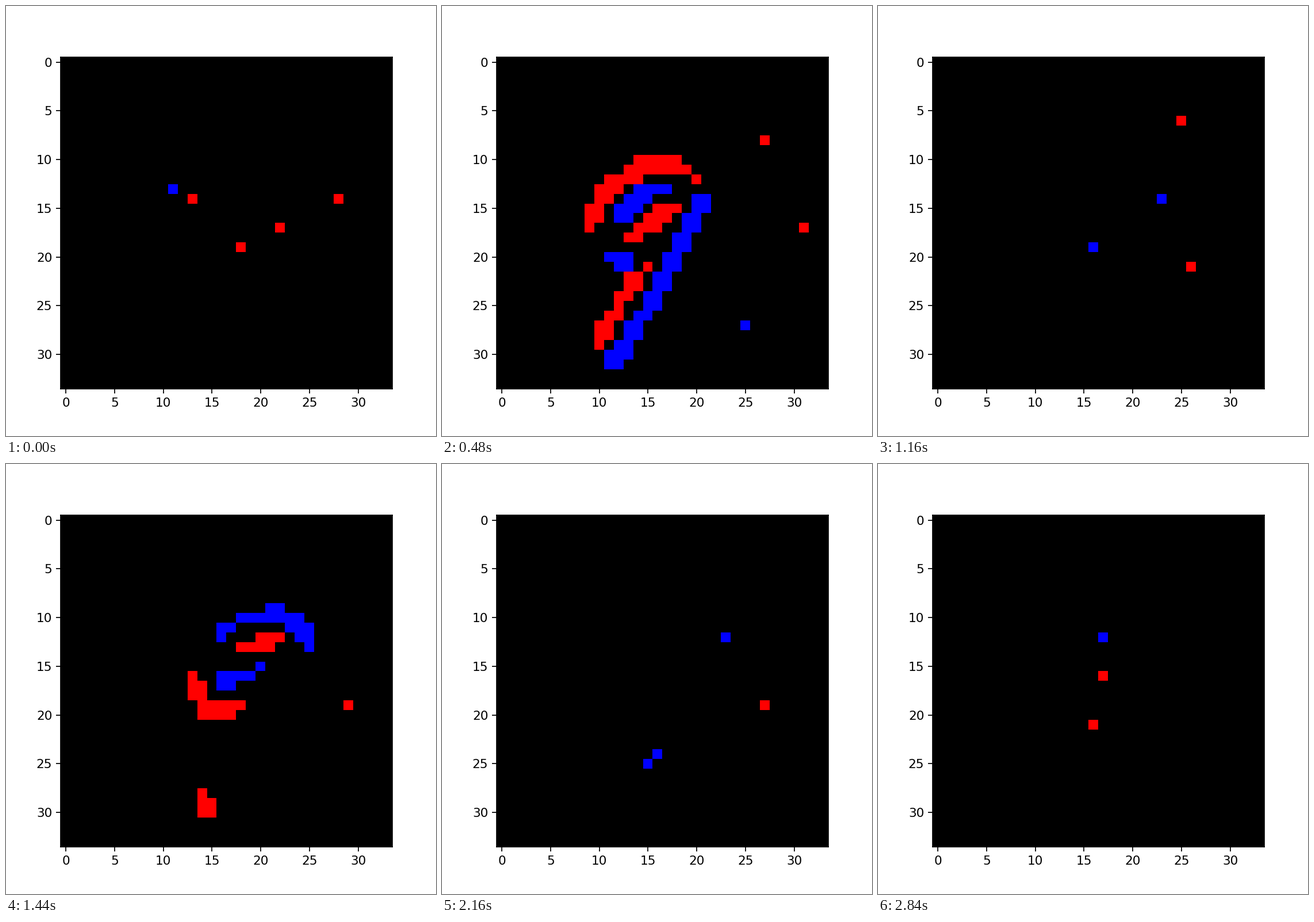
A matplotlib script for the animation above (2.88 s loop, 748 by 748 pixels).

```python
import numpy as np
import matplotlib.pyplot as plt
from matplotlib.animation import FuncAnimation

SIZE, DPI, N = 748, 156, 34
FRAMES, INTERVAL, SWEEP = 72, 40, 24
PEAK, HALF = 13, 8        # middle and half length of a burst, in frames
RADIUS, HOP = 1.35, 1.05  # pen radius and half step at full speed, in cells
RED, BLUE = (255, 0, 0), (0, 0, 255)

# Pen path of a handwritten 9.
KNOTS = np.array([
    (19.5, 13.4), (17.8, 11.9), (14.5, 12.2), (12, 14), (10.4, 16.7),
    (11, 18.8), (13.5, 19.1), (16.5, 17.2), (19.5, 13.8), (17.4, 18),
    (15.3, 22), (13.5, 25), (11.2, 29.2)])

# The digit sweeps down, up and left: middle of each sweep, half travel.
SWEEPS = [((0.35, 0.6), (1.8, 3)), ((4.35, -1.4), (1.8, -3)), ((2.5, -3), (-3, 0))]

steps = np.linspace(0, len(KNOTS) - 1, 260)
pen = np.column_stack([np.interp(steps, range(len(KNOTS)), axis) for axis in KNOTS.T])
rows, cols = np.indices((N, N))
cells = np.column_stack([cols.ravel(), rows.ravel()])


def brightness(points):
    gap = points[:, None] - pen
    dist = np.sqrt((gap ** 2).sum(axis=2).min(axis=1))
    return np.clip(RADIUS - dist + 0.5, 0, 1)


def change(points, step):
    """Brightness lost at each cell while the digit moves by two steps."""
    return (brightness(points + step) - brightness(points - step)).reshape(N, N)


def events(n):
    rng = np.random.default_rng(n + 7)
    middle, travel = np.array(SWEEPS[n // SWEEP])
    phase = np.clip((n % SWEEP - PEAK) / HALF, -1, 1) * np.pi / 2
    speed = np.cos(phase) ** 2
    points = cells - middle - travel * np.sin(phase)
    step = HOP * travel / np.hypot(*travel)

    limit = rng.normal(0.5, 0.04, (N, N))
    late = rng.random((N, N)) < 0.03
    moved, edge = change(points, step * speed), change(points, step)
    moved = np.where(late, edge, moved)

    img = np.zeros((N, N, 3), np.uint8)
    img[moved > limit] = RED
    img[moved < -limit] = BLUE
    for _ in range(rng.integers(0, 4)):
        x, y = rng.integers(0, N, 2)
        img[y, x] = RED if rng.random() < 0.7 else BLUE
    return img


fig = plt.figure(figsize=(SIZE / DPI, SIZE / DPI), dpi=DPI)
# Default margins of a 4.8 inch square.
ax = fig.add_axes(np.array([0.125, 0.11, 0.775, 0.77]) * 4.8 * DPI / SIZE)
view = ax.imshow(events(0), interpolation="nearest")
ax.set_xticks(range(0, N, 5))
ax.set_yticks(range(0, N, 5))


def draw(n):
    view.set_data(events(n))
    return (view,)


anim = FuncAnimation(fig, draw, frames=FRAMES, interval=INTERVAL,
                     init_func=lambda: draw(0), repeat=True, repeat_delay=0)
plt.show()
```
